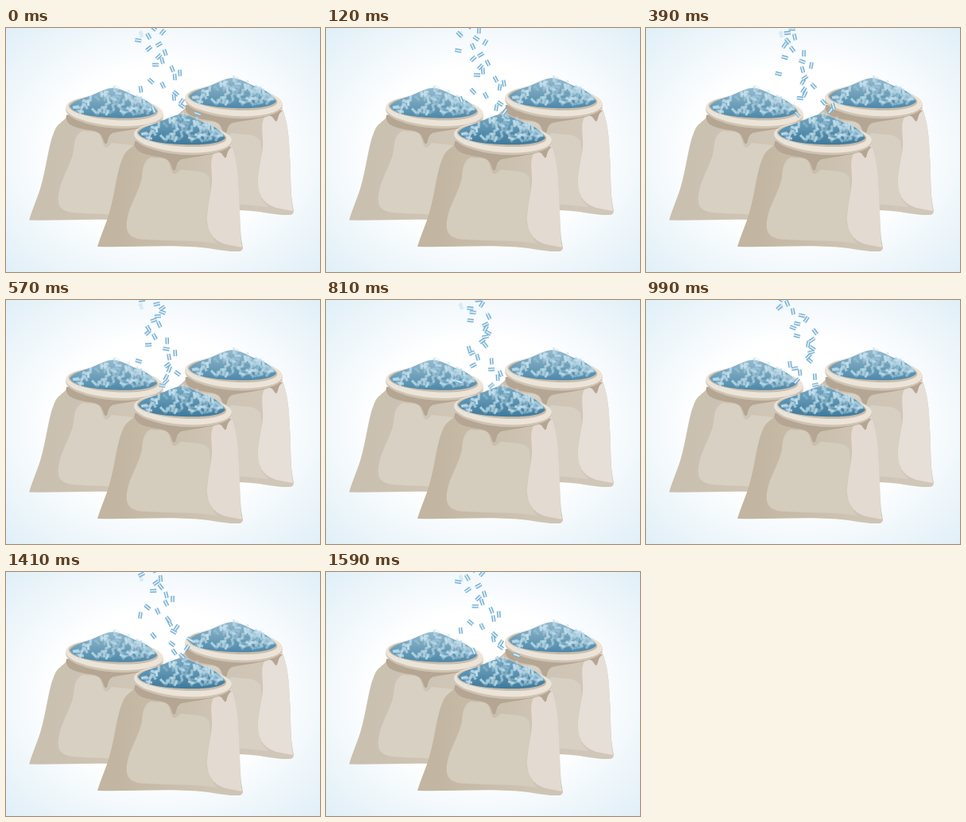
These frames come from a looping animation (395 by 308 pixels, 1.62 s). An HTML page with a canvas:

```html
<!DOCTYPE html>
<html lang="en">
<head>
<meta charset="utf-8">
<title>Filling sacks</title>
<style>
  html, body { margin: 0; width: 100%; height: 100%; overflow: hidden; background: #fff; }
  canvas { display: block; }
</style>
</head>
<body>
<canvas id="stage" width="395" height="308"></canvas>
<script>
const W = 395, H = 308, LOOP = 1620, STEP = 30, SPEED = 0.108, GRAINS = 34;
const ctx = document.getElementById('stage').getContext('2d');
const scenery = new OffscreenCanvas(W, H);
const bg = scenery.getContext('2d');

let seed = 11;
const random = () => (seed = (seed * 16807) % 2147483647) / 2147483647;
const between = (low, high) => low + random() * (high - low);

// Grains leave the top edge at even intervals and drift right as they fall.
const grains = Array.from({ length: GRAINS }, (_, i) => ({
  start: i * LOOP / GRAINS,
  x: between(166, 196), drift: between(0, 0.52),
  angle: between(0, Math.PI), spin: between(-0.002, 0.002)
}));

// Grains resting on the mound, denser towards its top.
const specks = Array.from({ length: 85 }, () => {
  const u = between(-1, 1), top = 110 + 23 * Math.abs(u) ** 1.4;
  return {
    x: 222 + u * 49, y: top + random() ** 1.3 * (141 - top),
    angle: between(0, Math.PI), alpha: between(0.25, 0.9)
  };
});

const shapes = {
  body: new Path2D('M163 144C161 150 152 153 148 161C139 180 138 205 130 233C126 247 120 260 115 276C152 277 196 274 230 276C258 277 277 283 292 282Q298 282 298 277C293 254 295 232 293 208C292 185 291 166 283 146Z'),
  light: new Path2D('M262 156C254 172 262 185 258 203C255 220 251 238 254 251C257 262 264 269 276 273L297 277C293 254 295 232 293 208C292 185 291 166 283 146Z'),
  patch: new Path2D('M183 163C173 167 172 177 171 188C168 207 154 224 152 244C150 259 156 266 174 267C201 269 231 267 266 272C256 262 252 250 253 235C255 218 259 202 256 189C250 178 232 181 224 179C217 177 216 184 212 184C206 183 208 168 200 165C194 163 189 165 183 163Z'),
  shade: new Path2D('M162 143C160 152 166 157 178 160C190 163 198 162 204 167C209 172 208 179 212 180C215 178 213 170 220 166C232 163 255 161 267 157C272 156 273 163 276 164C279 162 277 155 284 150Z'),
  pile: new Path2D('M166 132C172 124 188 121 197 117C205 113 212 110 220 109C232 110 239 115 248 119C258 122 271 128 276 139C270 146 250 148 222 147C194 146 171 142 166 132Z')
};

const palettes = {
  front: { dark: '#c2b6a2', mid: '#cfc4b3', patch: '#d4ccbc', light: '#e3dad1', top: '#75a8c3', deep: '#3f7b9b' },
  back: { dark: '#cac0b0', mid: '#d0c7b8', patch: '#d7d0c3', light: '#e6dfd7', top: '#93b9cd', deep: '#4f8aaa' }
};

function fill(shape, color) {
  bg.fillStyle = color;
  bg.fill(shape);
}

function blend(gradient, from, to) {
  gradient.addColorStop(0, from);
  gradient.addColorStop(1, to);
  return gradient;
}

function oval(x, y, rx, ry) {
  const path = new Path2D();
  path.ellipse(x, y, rx, ry, 0.07, 0, Math.PI * 2);
  return path;
}

function bar(c, length, width, color) {
  c.fillStyle = color;
  c.fillRect(-length / 2, -width / 2, length, width);
}

function placed(c, x, y, angle, alpha, draw) {
  c.save();
  c.translate(x, y);
  c.rotate(angle);
  c.globalAlpha = alpha;
  draw();
  c.restore();
}

function drawGrain(x, y, angle, alpha) {
  placed(ctx, x, y, angle, alpha, () => {
    bar(ctx, 8, 4.6, '#78b0d1');
    bar(ctx, 8, 1.8, '#dceef8');
  });
}

function drawSack(dx, dy, colors) {
  bg.save();
  bg.translate(dx, dy);
  fill(shapes.body, blend(bg.createLinearGradient(140, 0, 260, 0), colors.dark, colors.mid));
  fill(shapes.light, colors.light);
  fill(shapes.patch, colors.patch);
  fill(shapes.shade, '#b5a693');
  fill(oval(222.5, 140, 61.5, 20), '#cfc3b2');
  fill(oval(222.5, 138, 61.5, 19), '#ece4d8');
  fill(oval(221, 135.5, 56.5, 14), '#c9bdac');
  fill(shapes.pile, blend(bg.createLinearGradient(0, 110, 0, 146), colors.top, colors.deep));
  for (const s of specks) {
    placed(bg, s.x, s.y, s.angle, s.alpha, () => bar(bg, 8, 3.2, '#c3dfec'));
  }
  bg.restore();
}

function drawScenery() {
  bg.save();
  bg.translate(W / 2, H / 2);
  bg.scale(W / 2, H / 2);
  bg.fillStyle = blend(bg.createRadialGradient(0, 0, 0.68, 0, 0, 1.41), '#fff', '#e0eff7');
  bg.fillRect(-1, -1, 2, 2);
  bg.restore();
  drawSack(-86, -33.5, palettes.back);
  drawSack(64, -46, palettes.back);
  drawSack(0, 0, palettes.front);
}

function frame(now) {
  const time = Math.floor((now % LOOP) / STEP) * STEP;
  ctx.drawImage(scenery, 0, 0);
  drawGrain(170, 8, 1.3, 0.2);
  for (const g of grains) {
    const age = (time - g.start + LOOP) % LOOP, y = age * SPEED - 5;
    if (y > 114) continue;
    drawGrain(g.x + y * g.drift, y, g.angle + g.spin * age, Math.min(1, (116 - y) / 10));
  }
  requestAnimationFrame(frame);
}

drawScenery();
requestAnimationFrame(frame);
</script>
</body>
</html>
```
